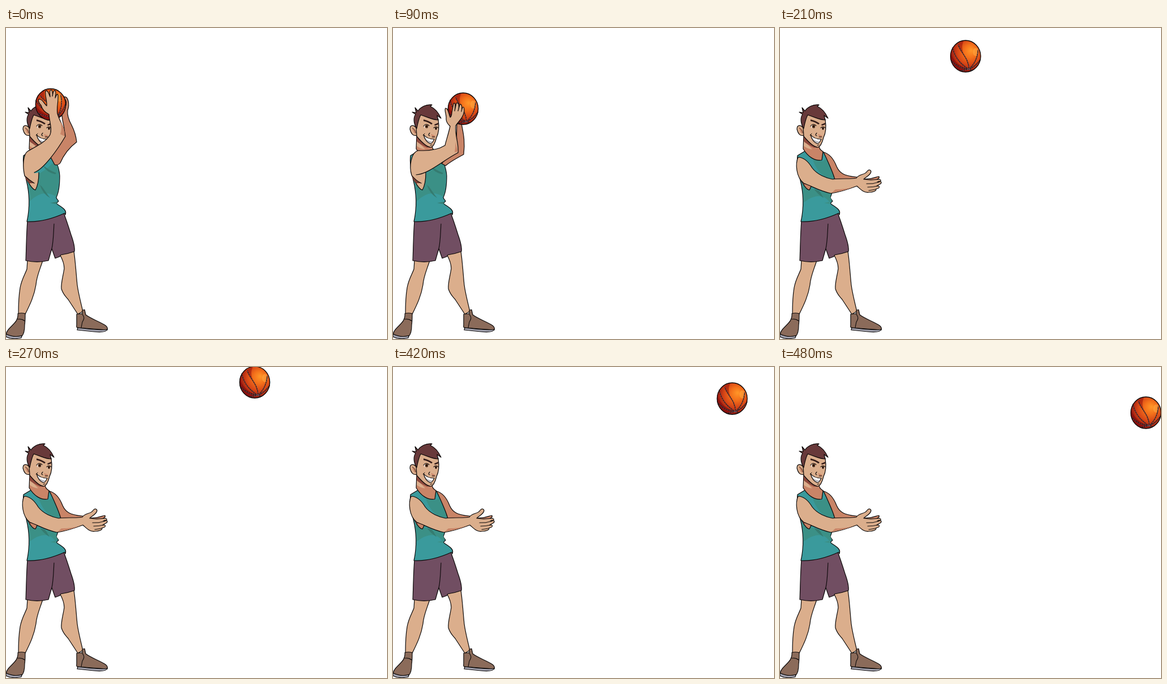
Animation of 674x551 px, one loop 2220 ms. Source, as an HTML page with a canvas:

```html
<!DOCTYPE html>
<html lang="en">
<head>
<meta charset="utf-8">
<title>Ball throw</title>
<style>
html, body { margin: 0; width: 100%; height: 100%; overflow: hidden; background: #fff; }
canvas { display: block; }
</style>
</head>
<body>
<canvas id="stage" width="674" height="551"></canvas>
<script>
const ctx = document.getElementById('stage').getContext('2d');
const LOOP = 2220;
const INK = '#0b0808', SKIN = '#dbae8c', SHADE = '#c98467', TEAL = '#3a9a9c',
      GREEN = '#3b9086', FOLD = '#357b70', PLUM = '#714e62', SHOE = '#8b6b5a',
      SOLE = '#a5a5b2', HAIR = '#68393a';

function shape(d, fill, line = 1.2, ink = INK) {
  const path = new Path2D(d);
  if (fill) { ctx.fillStyle = fill; ctx.fill(path); }
  if (line) { ctx.strokeStyle = ink; ctx.lineWidth = line; ctx.stroke(path); }
}
const line = (d, w = 1.1) => shape(d, null, w);
const flat = (d, fill) => shape(d, fill, 0);

function dot(x, y, rx, ry, fill) {
  ctx.fillStyle = fill;
  ctx.beginPath();
  ctx.ellipse(x, y, rx, ry, 0, 0, Math.PI * 2);
  ctx.fill();
}

function drawLegs() {
  shape('M38 411L37 427C34 436 28 444 25 460C22 478 22 492 22 507L34 507C43 489 50 474 53 455C54 440 60 428 65 412Z', SKIN);
  shape('M95 401C100 410 103 418 103 426C101 440 97 452 98 462C101 472 105 475 110 481L127 507L136 502C132 485 128 470 126 455C124 435 123 415 120 395Z', SKIN);
  shape('M21 506Q27 504 34 506C34 515 34 520 33 526C33 535 31 543 28 546C18 549 8 547 0 543C1 537 5 533 10 528C17 521 22 516 21 506Z', SHOE);
  shape('M0 542C8 546 18 548 28 545L27 549C16 552 6 550 0 547Z', SOLE);
  line('M21 516Q28 515 33 519');
  shape('M125 507L135 506L135 500L139 499L141 508C150 515 165 520 176 527C180 530 180 534 179 535L127 531Q124 531 125 526Z', SHOE);
  shape('M127 531C145 533 165 536 179 534C178 539 165 539 155 538L126 535Z', SOLE);
  line('M134 506C140 513 138 516 135 521L133 531');
}

function drawShorts() {
  shape('M38 342C36 365 36 390 35 412C48 415 62 415 75 412L81 391L87 408L95 405L97 402Q110 400 121 396C122 390 120 380 115 366C110 350 105 335 101 325C85 336 60 342 38 342Z', PLUM);
  line('M85 347C84 362 84 378 81 391');
}

function drawShirt(open) {
  shape('M46 217L31 226C29 240 33 258 36 270C41 290 43 315 37 343C58 344 82 338 104 328L105 331C108 323 101 319 92 313C88 311 90 309 93 307C92 304 89 303 89 300C94 290 95 275 95 262C94 245 88 234 76 219L60 226Z', TEAL);
  if (open) {
    flat('M58 233L76 236L81 232Q91 249 96 267L82 265Q66 257 58 233Z', GREEN);
    flat('M40 277C55 285 72 291 90 292L89 300Q91 304 92 307L78 310L90 312Q74 285 42 309Z', GREEN);
    flat('M60 285Q66 294 77 301Q70 289 69 288Z', FOLD);
  } else {
    flat('M58 258C70 252 77 245 84 238L91 244C95 259 94 282 89 299Q65 284 42 307Q43 291 39 276L52 287Z', GREEN);
    flat('M65 243Q76 252 89 257L87 259Q72 256 65 243Z', FOLD);
    flat('M60 278C66 282 69 290 78 301Q65 294 60 278Z', FOLD);
    flat('M78 310L90 308L91 312Z', FOLD);
  }
}

function drawHead() {
  shape('M42 189L41 214C50 229 62 236 74 234L76 219Q69 215 69 208Z', SHADE);
  flat('M42 199L57 215Q48 214 42 209Z', SKIN);
  flat('M42 192Q54 204 66 211L60 212Q46 205 42 201Z', '#8e493d');
  shape('M42 178C36 170 30 172 30 179C32 188 36 192 42 190', SKIN);
  flat('M34 177Q40 178 41 187Q36 187 34 177Z', SHADE);
  line('M34 177Q40 180 40 186', .7);
  shape('M47 153L80 162C82 175 81 186 77 194C75 202 72 210 67 211.5C60 211 52 204 42 192L41 176Z', SKIN);
  shape('M41 177C36 167 36 158 40 153L34 149L41 150L39 141L44 147C49 140 58 135 69 136L66 139C74 142 80 149 85 160L78 155L80 163C70 163 62 158 49 154C46 160 44 167 42 178Z', HAIR);
  // brows, eyes
  flat('M54 162Q63 164 70 169L68 171Q61 166 54 165Z', '#321b19');
  flat('M73 171L80 168L80 171L74 173Z', '#321b19');
  dot(59, 174.5, 4, 3.2, '#fff');
  dot(76, 178, 3, 2.8, '#fff');
  dot(59.5, 174.5, 3, 3.2, '#6f3f22');
  dot(76, 178, 2.3, 2.7, '#6f3f22');
  dot(59.5, 174.5, 1.5, 1.7, INK);
  dot(76, 178, 1.2, 1.5, INK);
  line('M54 174Q58 168 64 173M72 177Q76 173 80 177');
  // nose, mouth
  flat('M67 188L75 191L71 195Z', SHADE);
  line('M65 186Q61 190 65 191M69 193L74 193');
  shape('M54 189C58 194 64 197 73 197C71 201 69 205 66 205C59 202 56 197 54 189Z', '#fff');
  flat('M57 196Q63 201 70 201Q67 206 62 202Z', '#b9b7bd');
  line('M53 190L56 187M66 208L69 207', 1);
}

function drawPit() {
  shape('M33 260C38 272 46 286 52 287C56 280 58 268 58 256', SKIN);
  flat('M33 260Q40 270 50 275L41 275Q34 269 33 260Z', '#7a4034');
}

const poses = [
  {
    back() {
      shape('M103 122C110 121 113 135 109 146C108 155 111 163 116 172C121 182 124 192 125 202C113 211 102 225 96 239Q92 244 86 242L79 229C85 217 98 204 104 190C104 175 99 165 99 153Z', SHADE);
      line('M105 127Q108 132 105 140');
    },
    front() {
      drawPit();
      shape('M50 256C68 249 92 214 105 192C104 178 95 165 91 152C89 142 93 130 92 119C91 115 89 118 87 124C88 118 89 113 87 111C84 109 83 116 82 121C83 115 82 109 79 110C76 111 78 118 78 122C75 114 73 109 70 112C68 117 73 129 72 138C67 134 65 126 59 126C55 127 59 134 62 137C64 144 68 149 76 153C77 166 82 180 78 189C72 200 59 207 39 218C30 223 29 245 33 262Q42 270 50 275', SKIN);
      flat('M96 165Q105 179 104 192L96 188Q100 178 96 165Z', SHADE);
    }
  },
  {
    back() {
      shape('M113 170L121 169C124 185 128 200 125 224C110 232 101 237 93 244L86 240C95 230 105 226 115 220C112 205 112 190 113 170Z', SHADE);
    },
    front() {
      drawPit();
      shape('M41 260C63 259 89 234 115 221C117 205 109 190 111 173C116 165 124 160 126 147C126 138 123 137 121 148C123 139 121 133 118 136L115 147C118 138 116 131 112 133L109 147C111 136 110 131 107 134L104 150C104 155 102 159 101 158C98 151 98 142 93 142C90 145 95 154 94 161C94 168 98 171 101 174C98 188 94 199 92 208C79 216 62 218 45 217C32 220 28 245 33 261Q40 270 50 275', SKIN);
      flat('M110 187Q110 205 115 219L109 220Q112 203 110 187Z', SHADE);
    }
  },
  {
    back() {
      shape('M120 187C130 177 133 164 136 152C138 148 140 151 138 159C141 150 144 150 142 158C145 152 148 154 146 163C146 174 139 182 128 188C127 205 131 220 126 238C112 239 105 247 95 250L92 243C103 240 109 234 116 233Z', SHADE);
      line('M138 159L134 168M142 158L139 167');
    },
    front() {
      drawPit();
      shape('M38 261C64 262 85 242 116 234C118 218 113 201 120 187C128 182 133 170 136 160C139 152 136 149 131 161C134 152 134 144 131 147L125 160C129 150 127 143 124 145L120 159C123 149 122 143 119 145C116 150 116 158 114 167L111 168C109 162 110 153 105 152C101 152 104 161 103 167C102 175 105 181 109 185C104 196 101 209 95 217C82 224 65 226 47 222C31 221 29 246 33 261Q40 270 50 275', SKIN);
      flat('M114 204Q111 220 116 233L110 229Q114 220 114 204Z', SHADE);
    }
  },
  {
    back() {
      shape('M77 220C88 223 95 232 100 245C105 257 113 262 135 264L150 267C162 269 170 263 175 263C177 266 172 269 167 270L133 271C120 268 108 267 97 268C92 251 84 235 77 220Z', SHADE);
    },
    front() {
      shape('M35 264C40 276 46 286 52 287L56 279', SHADE);
      flat('M34 262Q40 273 51 277L41 277Z', '#7a4034');
      shape('M42 275C28 264 27 240 32 229C43 229 51 238 57 248C66 260 82 266 93 268C110 266 125 268 135 266C140 258 150 261 154 254C157 250 161 251 161 255C159 262 151 264 148 268C158 270 168 269 176 268C181 270 177 273 172 273C178 270 181 273 178 276L171 280C178 279 177 284 170 285C171 289 164 291 158 291C148 293 142 285 136 280C120 286 105 291 90 293C70 289 56 280 42 275Z', SKIN);
      flat('M91 292L98 286Q117 286 132 281Q112 289 91 292Z', SHADE);
      line('M153 276Q164 277 175 273M155 282Q165 282 172 280M157 288L169 286', 1);
    }
  }
];

function drawBall(x, y, turn) {
  ctx.save();
  ctx.translate(x, y);
  ctx.rotate(turn);
  ctx.scale(1, 1.045);
  const glow = ctx.createRadialGradient(10, -10, 1, 5, -5, 34);
  glow.addColorStop(0, '#ff9427');
  glow.addColorStop(.3, '#f4711b');
  glow.addColorStop(.62, '#d64516');
  glow.addColorStop(1, '#8b1010');
  dot(0, 0, 27, 27, glow);
  flat('M-3 -26.5C-8 -18 -6 -8 -2 -1Q-9 -10 -14 -20Q-9 -25 -3 -26.5Z', 'rgba(140,12,12,.5)');
  flat('M-26 -4C-19 11 -8 18 5 22L-8 25Q-25 17 -26 -4Z', 'rgba(120,6,10,.5)');
  dot(18, -7, 5, 7, 'rgba(255,176,70,.5)');
  const seams = 'M-13 -19C-8 -5 6 4 6 22M-23 -14C-18 5 -7 14 5 22M22 -10C21 5 14 15 6 22M26 6Q18 17 6 22M-25 8Q-13 20 5 22M-9 25L5 22L12 24';
  shape(seams, null, 1.5, '#2a1518');
  ctx.setLineDash([1.5, 2.5]);
  shape(seams, null, .6, '#9a8496');
  ctx.restore();
  ctx.strokeStyle = INK;
  ctx.lineWidth = 1.3;
  ctx.beginPath();
  ctx.ellipse(x, y, 26.7, 28, 0, 0, Math.PI * 2);
  ctx.stroke();
}

// start, pose, ball x, ball y, ball turn
const steps = [
  [0, 0, 79, 135.5, -.3],
  [90, 1, 124, 143, 0],
  [150, 2, 222, 94.5, 0],
  [210, 3, 328.3, 50, 0],
  [270, 3, 440, 27, 0],
  [330, 3, 552, 38.5, 0],
  [420, 3, 600, 56, 0],
  [480, 3, 647.3, 81, 0]
];

function draw(t) {
  const [, pose, x, y, turn] = steps.findLast(s => s[0] <= t);
  ctx.fillStyle = '#fff';
  ctx.fillRect(0, 0, 674, 551);
  ctx.lineJoin = ctx.lineCap = 'round';
  drawLegs();
  drawShorts();
  drawShirt(pose === 3);
  drawHead();
  poses[pose].back();
  drawBall(x, y, turn);
  poses[pose].front();
}

const start = performance.now();
function tick() {
  draw((performance.now() - start) % LOOP);
  requestAnimationFrame(tick);
}
tick();
</script>
</body>
</html>
```
